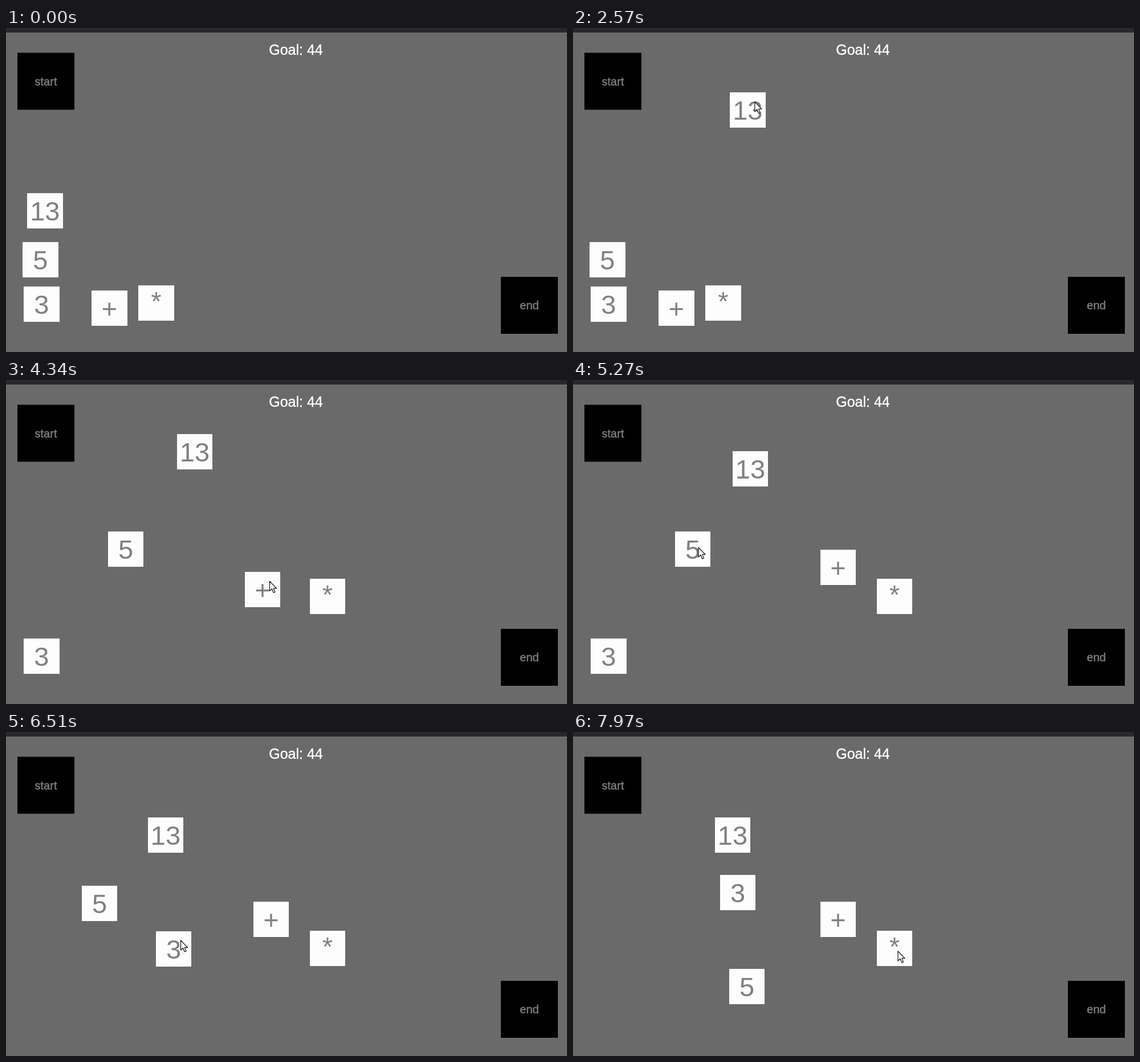
Write an HTML page that moves like this. It is 984 px wide and 569 px high and loops after 8000 ms.

```html
<!DOCTYPE html>
<html lang="en">
<head>
<meta charset="utf-8">
<title>Number puzzle</title>
<style>
  html, body { margin: 0; width: 100%; height: 100%; overflow: hidden; background: #6a6a6a; }
  svg { position: absolute; left: 0; top: 0; width: 984px; height: 569px; }
  text { font-family: "Liberation Sans", Arial, sans-serif; text-anchor: middle; fill: #808080; }
  .goal { font-size: 25px; fill: #fff; stroke: #fff; stroke-width: .4px; }
  .label { font-size: 20px; stroke: #808080; stroke-width: .4px; }
  .tile rect { fill: #fdfdfd; shape-rendering: crispEdges; }
  .tile text { font-size: 47px; }
  .bar { fill: #292929; }
</style>
</head>
<body>
<svg viewBox="0 0 984 569">
  <rect class="bar" width="984" height="8"/>
  <text class="goal" x="508.5" y="46.5">Goal: 44</text>
  <rect x="20" y="43.5" width="100" height="100"/>
  <text class="label" x="70" y="100.5">start</text>
  <rect x="868" y="437" width="100" height="100"/>
  <text class="label" x="918" y="494">end</text>
  <g id="tiles"></g>
  <path id="cursor" d="M0 0V17L4 13.3L6.7 20L9.4 18.9L6.8 12.4H12Z" fill="#fff" stroke="#111" stroke-width="1.2" stroke-linejoin="round"/>
</svg>
<script>
const LOOP = 8000, ENTER = 30, SIZE = 62, GRIP = [43.5, 16.5];

function add(parent, name, attrs) {
  const node = document.createElementNS('http://www.w3.org/2000/svg', name);
  for (const key in attrs) node.setAttribute(key, attrs[key]);
  return parent.appendChild(node);
}

// An actor rests at a point and follows a chain of eased legs
const actor = (node, x, y) => ({ node, at: [x, y], home: [x, y], legs: [] });

function makeTile(label, x, y, baseline = 48) {
  const node = add(document.getElementById('tiles'), 'g', { class: 'tile' });
  add(node, 'rect', { width: SIZE + 0.4, height: SIZE });
  add(node, 'text', { x: SIZE / 2, y: baseline }).textContent = label;
  return actor(node, x, y);
}

const cursor = actor(document.getElementById('cursor'), 3, 3);
const thirteen = makeTile('13', 37.3, 290);
const plus = makeTile('+', 150.3, 461);
const times = makeTile('*', 232.3, 452, 44);
const five = makeTile('5', 29.3, 376);
const three = makeTile('3', 31.3, 454);

let clock = ENTER;

function move(who, start, end, to) {
  who.legs.push({ start, end, from: who.at, to });
  who.at = to;
}

function point(end, x, y) {
  move(cursor, clock, end, [x, y]);
  clock = end;
}

// Travel to the tile, unless already over it, then carry it along
function drag(tile, start, end, x, y) {
  const offset = cursor.at.map((v, i) => v - tile.at[i]);
  const over = offset.every(v => v >= 0 && v <= SIZE);
  const [gx, gy] = over ? offset : GRIP;
  point(start, tile.at[0] + gx, tile.at[1] + gy);
  move(tile, start, end, [x, y]);
  point(end, x + gx, y + gy);
}

point(640, 919, 496);
point(1060, 510, 31);
point(1390, 56, 490);
point(1630, 147, 367);
point(1910, 895, 474);
drag(thirteen, 2270, 2640, 300, 95);
drag(five, 2880, 3120, 179, 266);
point(3540, 259, 451);
drag(times, 3620, 3920, 533, 348.5);
drag(plus, 4240, 4340, 419, 337);
drag(plus, 4340, 4480, 434, 297.5);
drag(thirteen, 4860, 5130, 280, 125);
point(5270, 220, 294);
drag(five, 5300, 5500, 133, 269.5);
drag(thirteen, 5780, 5940, 249, 149.5);
drag(three, 6240, 6510, 263, 349.5);
drag(three, 6510, 6740, 278, 172);
drag(three, 6740, 6900, 258, 250.5);
drag(five, 7200, 7490, 128, 380);
drag(five, 7490, 7700, 274, 416);
point(7970, 570, 385);

function position({ legs, home }, t) {
  const leg = legs.findLast(({ start }) => start <= t);
  if (!leg) return home;
  const u = Math.min(1, (t - leg.start) / (leg.end - leg.start || 1));
  const ease = u * u * (3 - 2 * u);
  return leg.from.map((v, i) => v + (leg.to[i] - v) * ease);
}

function draw(t) {
  for (const who of [thirteen, plus, times, five, three, cursor]) {
    who.node.setAttribute('transform', `translate(${position(who, t)})`);
  }
  cursor.node.setAttribute('visibility', t < ENTER ? 'hidden' : 'visible');
}

let begin;
function tick(now) {
  begin ??= now;
  draw((now - begin) % LOOP);
  requestAnimationFrame(tick);
}
draw(0);
requestAnimationFrame(tick);
</script>
</body>
</html>
```
